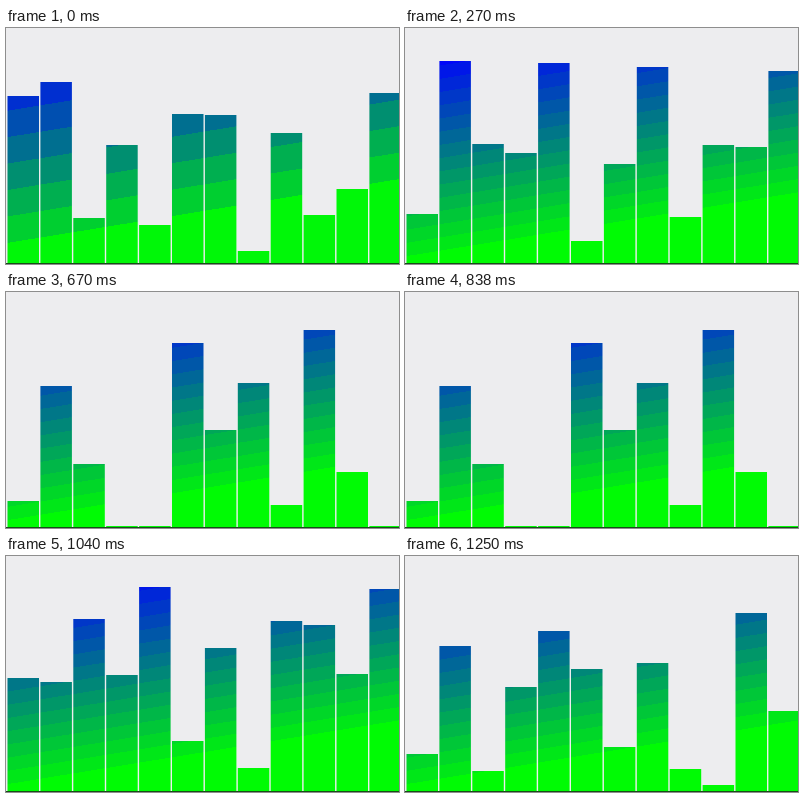
Write a matplotlib script that moves like this. It is 393 px wide and 236 px high and loops after 1.35 s.

```python
import numpy as np
import matplotlib.pyplot as plt
from matplotlib.animation import FuncAnimation

W, H, DPI = 393, 236, 64
STEP, LOOP = 10, 1350  # ms
BACKGROUND = np.array([237, 237, 239])
BASELINE = np.array([24, 78, 24])
LEFT, PITCH, BAR_WIDTH = 1.5, 32.9, 31.5
FLOOR = H - 1
COARSE_UNTIL = 120  # ms during which the ramp has few colours

# Start time of each shuffle and the bar heights it shows, in pixels.
SHUFFLES = {
    0: [167, 181, 45, 118, 38, 149, 148, 12, 130, 48, 74, 170],
    270: [49, 202, 119, 110, 200, 22, 99, 196, 46, 118, 116, 192],
    670: [26, 141, 63, 1, 1, 184, 97, 144, 22, 197, 55, 1],
    950: [113, 109, 172, 116, 204, 50, 143, 23, 170, 166, 117, 202],
    1250: [37, 145, 20, 104, 160, 122, 44, 128, 22, 6, 178, 80],
}


def gradient(step):
    """Tilted blue-to-green ramp; each band takes its middle colour."""
    y, x = np.mgrid[0:H, 0:W] + 0.5
    blue = np.clip(1.21 * (241.6 - y - 0.163 * x), 0, 255)
    band = blue // step
    blue = np.where(band > 0, (band + 0.5) * step, step / 4)
    return np.dstack([np.zeros_like(blue), 255 - blue, blue])


def coverage(size, start, end):
    """Share of each pixel lying between start and end."""
    pixel = np.arange(size)
    return np.clip(np.minimum(pixel + 1, end) - np.maximum(pixel, start), 0, 1)


def render(time):
    heights = SHUFFLES[max(start for start in SHUFFLES if start <= time)]
    mask = np.zeros((H, W, 1))
    for i, height in enumerate(heights):
        x = LEFT + i * PITCH
        mask[FLOOR - height:FLOOR, :, 0] += coverage(W, x, x + BAR_WIDTH)
    ramp = gradient(32 if time < COARSE_UNTIL else 16)
    picture = mask * ramp + (1 - mask) * BACKGROUND
    picture[FLOOR] = BASELINE
    return np.round(picture).astype(np.uint8)


fig = plt.figure(figsize=(W / DPI, H / DPI), dpi=DPI)
ax = fig.add_axes([0, 0, 1, 1])
ax.axis("off")
image = ax.imshow(render(0), interpolation="nearest", aspect="auto")


def update(frame):
    image.set_data(render(frame * STEP))
    return [image]


animation = FuncAnimation(fig, update, frames=LOOP // STEP, interval=STEP,
                          repeat=True, repeat_delay=0, blit=False)
plt.show()
```
